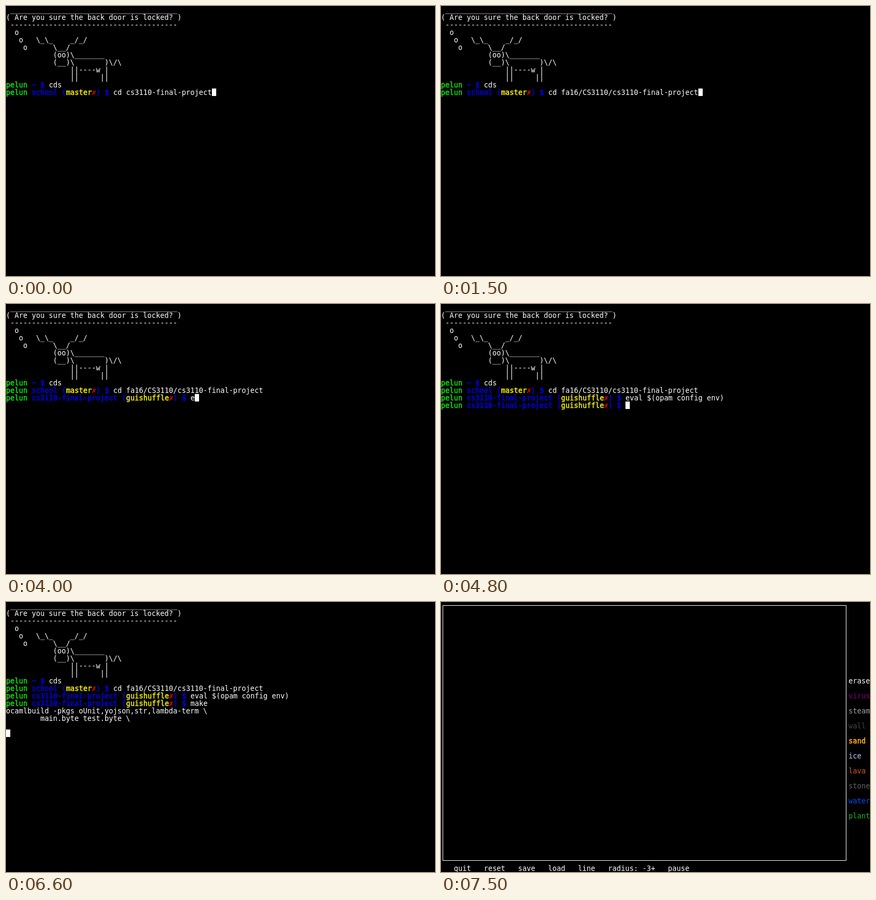
Animation of 800x504 px, one loop 8000 ms. Source, as an HTML page:

```html
<!DOCTYPE html>
<html lang="en">
<head>
<meta charset="utf-8">
<title>Terminal session</title>
<style>
html, body { margin: 0; width: 100%; height: 100%; overflow: hidden; background: #000; }
svg { display: block; }
text { font: 13.288px "DejaVu Sans Mono", monospace; white-space: pre; fill: currentColor; }
.b { stroke: currentColor; stroke-width: .6px; }
</style>
</head>
<body>
<svg id="term" width="800" height="504" viewBox="0 0 800 504"></svg>
<script>
const term = document.getElementById('term');
const CW = 8, CH = 14, BASE = 12, LOOP = 8000;
const WHITE = '#fff', GREEN = '#10d810', BLUE = '#0000e4', YELLOW = '#ebe610', RED = '#d80000';

const glyphs = (row, col, s, color, bold, dy) => s.trim()
  ? `<text x="${col * CW}" y="${row * CH + BASE + dy}" color="${color}"${bold ? ' class="b"' : ''}>${s}</text>`
  : '';

// Underscores sit a little higher than the font places them.
const put = (row, col, s, color = WHITE, bold = false) =>
  glyphs(row, col, s.replace(/_/g, ' '), color, bold, 0) +
  glyphs(row, col, s.replace(/[^_]/g, ' '), color, bold, -1.4);

const cursor = (row, col) =>
  `<rect x="${col * CW}" y="${row * CH}" width="${CW}" height="${CH}" fill="#fff"/>`;

const lines = (row, list) => list.map((s, i) => put(row + i, 0, s)).join('');

// Draws a prompt with its command; returns markup and the column after the command.
function prompt(row, dir, branch, cmd) {
  let col = 0, svg = '';
  const add = (s, color, bold = true) => {
    svg += put(row, col, s, color, bold);
    col += s.length;
  };
  add('pelun ', GREEN);
  add(dir + ' ', BLUE);
  if (branch) {
    add('(', BLUE);
    add(branch, YELLOW);
    add('✗', RED);
    add(') ', BLUE);
  }
  add('$ ', BLUE);
  add(cmd, WHITE, false);
  return { svg, col };
}

const PROJECT = 'cs3110-final-project';
const CD = 'cd fa16/CS3110/' + PROJECT;
const EVAL = 'eval $(opam config env)';
const rule = c => ' ' + c.repeat(39);

const intro = lines(0, [
  rule('_'),
  '( Are you sure the back door is locked? )',
  rule('-'),
  '  o',
  '   o   \\_\\_    _/_/',
  '    o      \\__/',
  '           (oo)\\_______',
  '           (__)\\       )\\/\\',
  '               ||----w |',
  '               ||     ||'
]) + prompt(10, '~', '', 'cds').svg;

const shell = [
  cmd => prompt(11, 'school', 'master', cmd),
  cmd => prompt(12, PROJECT, 'guishuffle', cmd),
  cmd => prompt(13, PROJECT, 'guishuffle', cmd)
];

// The last command is the one being edited.
function typing(...cmds) {
  let svg = intro, p;
  cmds.forEach((cmd, i) => { p = shell[i](cmd); svg += p.svg; });
  return svg + cursor(10 + cmds.length, p.col);
}

function building(out, row, col) {
  return intro + [CD, EVAL, 'make'].map((cmd, i) => shell[i](cmd).svg).join('') +
    lines(14, ['ocamlbuild -pkgs oUnit,yojson,str,lambda-term \\',
      '        main.byte test.byte \\', '', ...out]) + cursor(row, col);
}

function game() {
  const elements = [
    ['erase', WHITE], ['virus', '#800080'], ['steam', '#a0a0a0'], ['wall', '#444'],
    ['sand', '#ffaa20'], ['ice', '#c4c4ff'], ['lava', '#d65a14'], ['stone', '#646464'],
    ['water', '#0050ff'], ['plant', '#20b420']
  ];
  return '<rect x="3.5" y="6.5" width="752" height="476" fill="none" stroke="#fff"/>' +
    elements.map(([s, c], i) => put(10 + 2 * i, 95, s, c, s === 'sand')).join('') +
    put(35, 3, 'quit   reset   save   load   line   radius: -3+   pause');
}

const progress = '00:00:00 38   (38  ) main.byte'.padEnd(89) + '-------- |';

const scenes = [
  [0, typing('cd ' + PROJECT)],
  [600, typing('git commit -am "fix element shuffle logic"')],
  [1100, typing('make')],
  [1300, typing(EVAL)],
  [1500, typing(CD)],
  [1700, typing('cds')],
  [2100, typing(CD)],
  [2400, typing(CD, '')],
  [4000, typing(CD, 'e')],
  [4300, typing(CD, EVAL)],
  [4800, typing(CD, EVAL, '')],
  [5400, typing(CD, EVAL, 'm')],
  [6000, typing(CD, EVAL, 'ma')],
  [6300, typing(CD, EVAL, 'mak')],
  [6400, typing(CD, EVAL, 'make')],
  [6600, building([], 17, 0)],
  [6800, building([progress], 17, 99)],
  [6900, building(['Finished, 38 targets (38 cached) in 00:00:00.', './main.byte'], 19, 0)],
  [7500, game()]
];

let shown = null;
function draw() {
  const t = performance.now() % LOOP;
  const scene = scenes.findLast(s => s[0] <= t);
  if (scene !== shown) {
    shown = scene;
    term.innerHTML = scene[1];
  }
  requestAnimationFrame(draw);
}
draw();
</script>
</body>
</html>
```
